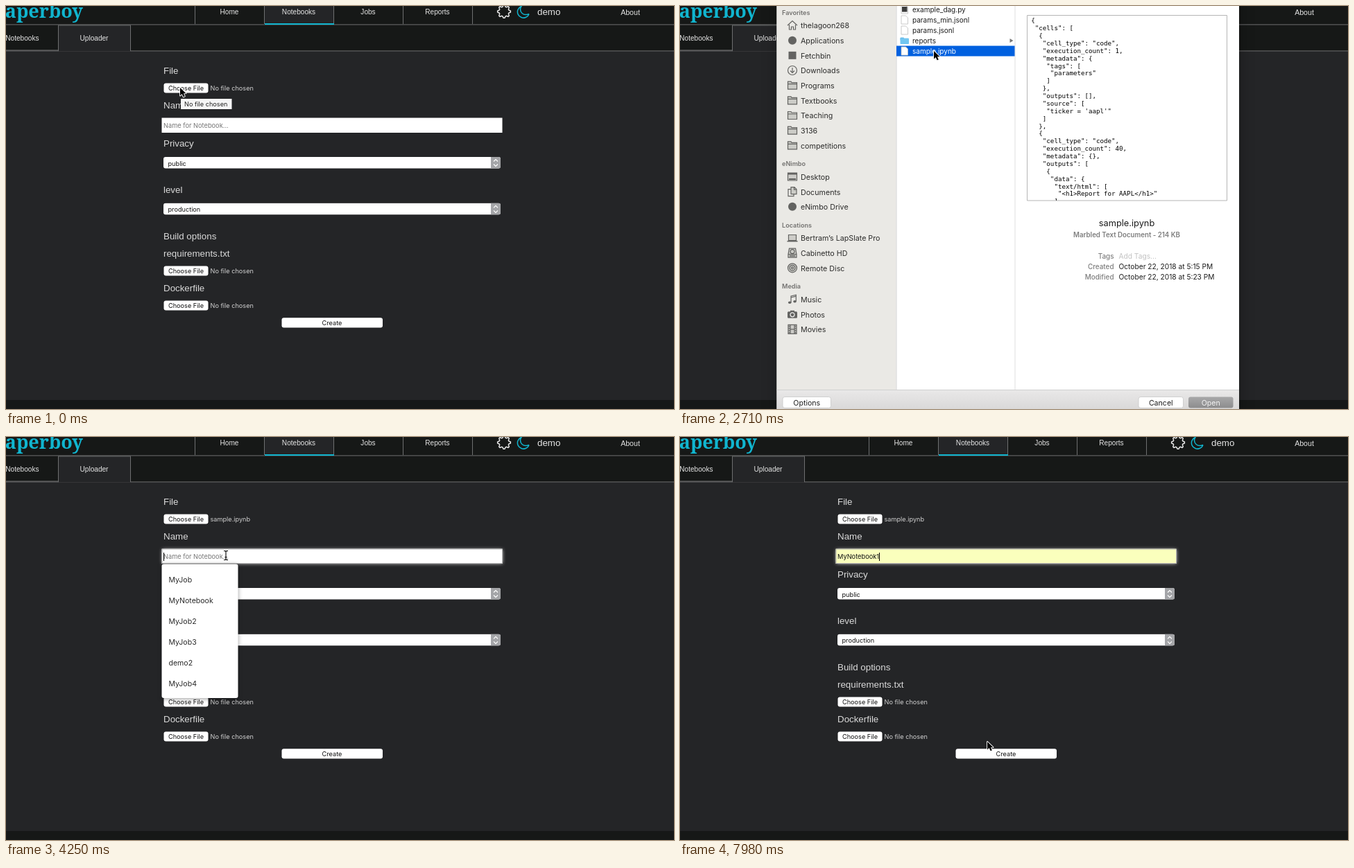
Recreate the animation shown at these times as an HTML page with a canvas. Size 963 px wide and 582 px high, loop 8000 ms.

```html
<!DOCTYPE html>
<html lang="en">
<head>
<meta charset="utf-8">
<title>Notebook uploader</title>
<style>
html, body { margin: 0; width: 100%; height: 100%; overflow: hidden; background: #242527; }
canvas { display: block; }
</style>
</head>
<body>
<canvas id="stage" width="963" height="582"></canvas>
<script>
const ctx = document.getElementById('stage').getContext('2d');
const LOOP = 8000;
const UI = 'Inter, sans-serif';
const WEB = '"Liberation Sans", Arial, sans-serif';
const MONO = '"DejaVu Sans Mono", monospace';
const TEAL = '#10b5cf', DARK = '#161817', BODY = '#242527', LINE = '#6e6f70';

// Each row starts with the time from which it holds.
const cursorSteps = [
  [0, 251, 118], [1380, 285, 102], [1530, 325, 82], [1820, 355, 62], [1970, 366, 52],
  [2120, 366, 58], [2260, 366, 65], [3480, 360, 95], [3620, 345, 130], [3800, 326, 159],
  [3950, 317, 171, 'beam'], [5890, 334, 182], [6190, 321, 189], [6340, 302, 190],
  [6480, 297, 199], [6930, 298, 215], [7080, 300, 240], [7230, 304, 275],
  [7380, 309, 310], [7530, 315, 345], [7680, 324, 380], [7830, 390, 414], [7980, 443, 440]
];
const typedSteps = [[0, 0], [4700, 1], [4850, 2], [5140, 3], [5290, 5], [5440, 6],
  [5590, 8], [5740, 10], [5890, 11]];
const sheetSteps = [[0, null], [930, -259], [1080, 0], [3150, -391.5], [3330, null]];
const caretSteps = [[0, false], [4250, true], [6190, false], [6780, true], [7230, false], [7980, true]];
const history = ['MyJob', 'MyNotebook', 'MyJob2', 'MyJob3', 'demo2', 'MyJob4', 'MyNotebook1'];

const sidebar = [
  [9.5, 'Favorites', ['house:thelagoon268', 'dot:Applications', 'square:Fetchbin', 'download:Downloads',
    'folder:Programs', 'folder:Textbooks', 'folder:Teaching', 'folder:3136', 'folder:competitions']],
  [228, 'eNimbo', ['desktop:Desktop', 'pages:Documents', 'dot:eNimbo Drive']],
  [316.5, 'Locations', ['laptop:Bertram’s LapSlate Pro', 'drive:Cabinetto HD', 'disc:Remote Disc']],
  [405, 'Media', ['music:Music', 'camera:Photos', 'film:Movies']]
];
const code = `{
 "cells": [
  {
   "cell_type": "code",
   "execution_count": 1,
   "metadata": {
    "tags": [
     "parameters"
    ]
   },
   "outputs": [],
   "source": [
    "ticker = 'aapl'"
   ]
  },
  {
   "cell_type": "code",
   "execution_count": 40,
   "metadata": {},
   "outputs": [
    {
     "data": {
      "text/html": [
       "<h1>Report for AAPL</h1>"
      ]`.split('\n');

const held = (steps, t) => steps.filter(s => s[0] <= t).pop();

function text(str, x, midY, size, color, { font = UI, align = 'left', weight = 400 } = {}) {
  ctx.font = `${weight} ${size}px ${font}`;
  ctx.fillStyle = color;
  ctx.textAlign = align;
  ctx.fillText(str, x, midY + size * 0.36);
}
function rect(x, y, w, h, color) {
  ctx.fillStyle = color;
  ctx.fillRect(x, y, w, h);
}
function round(x, y, w, h, r, color, border) {
  ctx.beginPath();
  ctx.roundRect(x, y, w, h, r);
  ctx.fillStyle = color;
  ctx.fill();
  if (border) stroke(border);
}
function stroke(color, width = 1) {
  ctx.strokeStyle = color;
  ctx.lineWidth = width;
  ctx.stroke();
}
function path(points, close) {
  ctx.beginPath();
  points.forEach(([x, y]) => ctx.lineTo(x, y));
  if (close) ctx.closePath();
}
function circle(x, y, r) {
  ctx.beginPath();
  ctx.arc(x, y, r, 0, Math.PI * 2);
}
function vertical(y0, y1, top, bottom) {
  const g = ctx.createLinearGradient(0, y0, 0, y1);
  g.addColorStop(0, top);
  g.addColorStop(1, bottom);
  return g;
}
function withShadow(color, blur, dy, draw) {
  ctx.save();
  ctx.shadowColor = color;
  ctx.shadowBlur = blur;
  ctx.shadowOffsetY = dy;
  draw();
  ctx.restore();
}

function drawHeader() {
  rect(0, 0, 963, 65, DARK);
  rect(0, 26.4, 963, 1, LINE);
  rect(0, 64.4, 963, 1, LINE);
  rect(372, 0, 101, 27, BODY);
  for (let x = 272; x <= 672; x += 100) rect(x, 0, 1, 26, LINE);
  rect(373, 25, 100, 2, TEAL);
  ['Home', 'Notebooks', 'Jobs', 'Reports'].forEach((name, i) =>
    text(name, 322 + i * 100, 8.5, 10.1, '#e4e4e4', { font: WEB, align: 'center' }));
  text('paperboy', 111, 6.8, 27, TEAL, { font: '"Noto Serif", serif', align: 'right', weight: 600 });

  ctx.beginPath();
  for (let i = 0; i < 32; i++) {
    const a = (i - 0.5) * Math.PI / 16, r = i % 4 < 2 ? 9.4 : 7.2;
    ctx.lineTo(718 + r * Math.cos(a), 8 + r * Math.sin(a));
  }
  ctx.closePath();
  stroke('#e8e8e8', 1.5);
  ctx.beginPath();
  ctx.arc(746, 8.5, 8.6, 0.35, 4.35);
  ctx.quadraticCurveTo(739.5, 6, 744, 10.5);
  ctx.quadraticCurveTo(748, 14, 754.1, 11.5);
  stroke(TEAL, 1.5);
  text('demo', 766, 8.5, 13.33, '#e4e4e4', { font: WEB });
  text('About', 900, 9, 10.6, '#e4e4e4', { font: WEB, align: 'center' });

  rect(75, 27.4, 105, 37.6, LINE);
  rect(76, 28.4, 103, 37, BODY);
  rect(0, 63.4, 75, 1, LINE);
  text('Notebooks', 47.5, 46, 10.1, '#e4e4e4', { font: WEB, align: 'right' });
  text('Uploader', 127, 46.5, 10.1, '#e4e4e4', { font: WEB, align: 'center' });
}

function drawFileInput(y, name) {
  round(227.5, y - 7, 64, 14, 3, '#fff');
  text('Choose File', 259.5, y + 0.3, 9.17, '#111', { align: 'center' });
  text(name, 294.5, y + 0.3, 9.17, '#d0d0d0');
}
function drawSelect(y, value) {
  ctx.save();
  ctx.beginPath();
  ctx.roundRect(227, y - 8.5, 486, 16.5, 3);
  ctx.clip();
  rect(227, y - 9, 486, 18, '#fff');
  rect(699, y - 9, 14, 18, '#a4a5a8');
  ctx.restore();
  path([[703, y - 2], [706, y - 5], [709, y - 2]]);
  stroke('#fff', 1.2);
  path([[703, y + 2], [706, y + 5], [709, y + 2]]);
  stroke('#fff', 1.2);
  text(value, 233.5, y + 0.7, 9.17, '#111');
}
function drawForm(t, typed) {
  const focused = t >= 4250, filled = t >= 6480;
  [['File', 93], ['Name', 143], ['Privacy', 198.5], ['level', 265], ['Build options', 332],
    ['requirements.txt', 357], ['Dockerfile', 407]].forEach(([label, y]) =>
    text(label, 227, y, 13.33, '#dadada', { font: WEB }));
  drawFileInput(118.5, t >= 3330 ? 'sample.ipynb' : 'No file chosen');
  drawFileInput(382.5, 'No file chosen');
  drawFileInput(432.5, 'No file chosen');
  drawSelect(226.5, 'public');
  drawSelect(293.3, 'production');
  round(397.5, 450.3, 145.5, 14.2, 3, '#fff');
  text('Create', 470, 457.8, 9.17, '#111', { align: 'center' });

  const field = () => rect(224.5, 161.5, 491, 21.5, filled ? '#faffbd' : '#fff');
  if (focused) {
    withShadow('#e4e4e4', 5, 0, field);
    ctx.beginPath();
    ctx.rect(225, 162, 490.5, 20.5);
    stroke('#b4b4b4');
  } else field();
  if (typed) text(typed, 227, 173, 9.25, '#111');
  else text('Name for Notebook...', 227, 173, 9.25, '#757575');
  if (held(caretSteps, t)[1]) {
    ctx.font = `400 9.25px ${UI}`;
    rect(Math.round(227 + ctx.measureText(typed).width), 167, 1, 12, '#000');
  }
}
function drawSuggestions(t, typed) {
  if (t < 4250 || t >= 6780) return;
  const rows = history.filter(s => s.startsWith(typed)).slice(0, 6);
  withShadow('rgba(0,0,0,.4)', 6, 1, () =>
    round(224.5, 183.5, 110, rows.length * 30 + 13.5, 3, '#fff'));
  if (t >= 6480) rect(224.5, 191, 110, 29, '#e6e6e6');
  rows.forEach((row, i) => text(row, 234.5, 206 + i * 30, 10.55, '#2a2a2a'));
}
function drawTooltip() {
  rect(252, 134, 73.5, 15, '#f6f6f6');
  text('No file chosen', 257, 141.5, 9.17, '#222');
}

// Icons are drawn around the origin.
function tint() {
  ctx.globalAlpha = 0.22;
  ctx.fill();
  ctx.globalAlpha = 1;
}
const icons = {
  house() {
    path([[-7, 0], [0, -6.5], [7, 0]]);
    ctx.moveTo(-4.5, -1); ctx.lineTo(-4.5, 6); ctx.lineTo(-1.5, 6); ctx.lineTo(-1.5, 2);
    ctx.lineTo(1.5, 2); ctx.lineTo(1.5, 6); ctx.lineTo(4.5, 6); ctx.lineTo(4.5, -1);
  },
  dot() { circle(0, 0, 6); ctx.fill(); },
  square() { ctx.beginPath(); ctx.rect(-5.5, -5.5, 11, 11); ctx.fill(); },
  download() {
    circle(0, 0, 6.5);
    ctx.moveTo(0, -4); ctx.lineTo(0, 3.5);
    ctx.moveTo(-3, 0.5); ctx.lineTo(0, 3.5); ctx.lineTo(3, 0.5);
  },
  folder() {
    path([[-6.5, 5.5], [-6.5, -5.5], [-2, -5.5], [-1, -4], [6.5, -4], [6.5, 5.5]], true);
    tint();
    ctx.moveTo(-6.5, -2); ctx.lineTo(6.5, -2);
  },
  desktop() {
    ctx.beginPath();
    ctx.rect(-6.5, -5.5, 13, 11);
    tint();
    ctx.fillRect(-6.5, -5.5, 13, 2.5);
    ctx.fillRect(-5, 2.5, 10, 2);
  },
  pages() {
    path([[-2, -6.5], [3, -6.5], [6, -3.5], [6, 3.5], [-2, 3.5]], true);
    tint();
    ctx.moveTo(2.5, -6.5); ctx.lineTo(2.5, -3); ctx.lineTo(6, -3);
    ctx.moveTo(-2, -3.5); ctx.lineTo(-6, -3.5); ctx.lineTo(-6, 6.5); ctx.lineTo(2, 6.5); ctx.lineTo(2, 3.5);
  },
  laptop() {
    ctx.beginPath();
    ctx.rect(-5.5, -4.5, 11, 8);
    tint();
    ctx.fillRect(-7.5, 4, 15, 1.5);
  },
  drive() {
    path([[-6, 6.5], [-6, 2], [-4.5, -6.5], [4.5, -6.5], [6, 2], [6, 6.5]], true);
    tint();
    ctx.moveTo(-6, 2); ctx.lineTo(6, 2);
    ctx.moveTo(3, -2); ctx.arc(0, -2, 3, 0, 7);
    ctx.fillRect(-4, 3.5, 8, 1.5);
  },
  disc() {
    circle(0, 0, 6.5);
    tint();
    ctx.moveTo(4, 0); ctx.arc(0, 0, 4, 0, 7);
    ctx.moveTo(1.5, 0); ctx.arc(0, 0, 1.5, 0, 7);
  },
  music() {
    ctx.beginPath();
    ctx.ellipse(-3.8, 4.8, 2.3, 1.8, 0, 0, 7);
    ctx.ellipse(3.5, 3.2, 2.3, 1.8, 0, 0, 7);
    ctx.fill();
    path([[-2, 5], [-2, -4.5], [5.3, -6.3], [5.3, 3]]);
    ctx.moveTo(-2, -2.5); ctx.lineTo(5.3, -4.3);
  },
  camera() {
    ctx.beginPath();
    ctx.roundRect(-7, -4, 14, 9.5, 1.5);
    ctx.rect(-3, -5.5, 6, 1.5);
    ctx.fill();
    ctx.strokeStyle = '#f0f0ee';
    circle(0, 0.7, 3);
  },
  film() {
    ctx.beginPath();
    ctx.rect(-6, -6.5, 12, 13);
    tint();
    ctx.rect(-3, -6.5, 6, 13);
    ctx.moveTo(-3, 0); ctx.lineTo(3, 0);
    for (let y = -5; y < 6; y += 3) {
      ctx.fillRect(-5.5, y, 2, 1.5);
      ctx.fillRect(3.5, y, 2, 1.5);
    }
  }
};
function drawIcon(kind, x, y, color) {
  ctx.save();
  ctx.translate(x, y);
  ctx.fillStyle = ctx.strokeStyle = color;
  ctx.lineWidth = 1.2;
  icons[kind]();
  if (kind !== 'dot' && kind !== 'square') ctx.stroke();
  ctx.restore();
}

function drawSidebar(active) {
  const label = active ? '#2c2c2b' : '#636363';
  for (const [y, title, items] of sidebar) {
    text(title, 147, y, 9.1, active ? '#737270' : '#808080', { weight: 600 });
    items.forEach((item, i) => {
      const [kind, name] = item.split(':'), rowY = y + 19 + i * 21.67;
      drawIcon(kind, 162, rowY - 0.5, active ? '#636361' : '#7c7c7c');
      text(name, 174, rowY, 10.7, label);
    });
  }
}
function drawFiles(selected) {
  ['example_dag.py', 'params_min.jsonl', 'params.jsonl', 'reports', 'sample.ipynb'].forEach((name, i) => {
    const y = 5 + i * 15, picked = selected && i === 4;
    if (picked) rect(312, 57.5, 170.5, 15, '#0060df');
    if (name === 'reports') {
      round(317.5, y - 4.5, 5.5, 4, 1, '#5db4e4');
      round(317.5, y - 3.5, 12.5, 8.5, 1, '#72c6f1');
      path([[475.5, y - 3], [480.5, y], [475.5, y + 3]], true);
      ctx.fillStyle = '#777';
      ctx.fill();
    } else {
      path([[319, y - 6], [325.5, y - 6], [328.5, y - 3], [328.5, y + 6], [319, y + 6]], true);
      ctx.fillStyle = '#fff';
      ctx.fill();
      stroke('#bdbdbd', 0.8);
      if (i === 0) rect(320, y - 4, 7.5, 7.5, '#3c3c3c');
    }
    text(name, 335, y, 10, picked ? '#fff' : '#1c1c1c');
  });
}
function drawPreview() {
  ctx.save();
  ctx.beginPath();
  ctx.rect(500.5, 13.5, 288, 267.5);
  stroke('#b5b5b5');
  ctx.clip();
  code.forEach((line, i) => text(line, 506.3, 21 + i * 10.875, 9.17, '#000', { font: MONO }));
  ctx.restore();
  text('sample.ipynb', 644, 313, 12.8, '#1c1c1c', { align: 'center' });
  text('Marbled Text Document - 214 KB', 644, 330.5, 9.7, '#7d7d7d', { align: 'center', weight: 600 });
  [['Tags', 'Add Tags...', '#c2c2c2'], ['Created', 'October 22, 2018 at 5:15 PM', '#1c1c1c'],
    ['Modified', 'October 22, 2018 at 5:23 PM', '#1c1c1c']].forEach(([key, value, color], i) => {
    const y = 361.5 + i * 15;
    text(key, 625.5, y, 9.9, '#7d7d7d', { align: 'right', weight: 500 });
    text(value, 632.5, y, 10.2, color);
  });
}
function drawButton(x, w, label, fill, color, border) {
  round(x, 564.5, w, 16, 3, fill, border);
  text(label, x + w / 2, 572.7, 10.6, color, { align: 'center' });
}
function drawSheet(t) {
  const offset = held(sheetSteps, t)[1];
  if (offset === null) return;
  const active = t >= 1080;
  ctx.save();
  ctx.translate(0, offset);
  withShadow('rgba(0,0,0,.3)', 20, 4, () => rect(139.5, -400, 666.5, 989, '#fff'));
  rect(139.5, -400, 172, 955, active ? '#eae9e5' : '#f4f4f4');
  rect(311.5, -400, 1, 955, '#d2d2d1');
  rect(482.5, -400, 1, 955, '#dfdfdf');
  rect(139.5, 554.5, 666.5, 34.5, active ? vertical(555, 590, '#e9e8e8', '#d5d4d4') : '#f4f4f4');
  rect(139.5, 554, 666.5, 1, active ? '#d0d0d0' : '#d9d9d9');
  drawSidebar(active);
  if (t >= 1230) drawFiles(t >= 2560);
  if (t >= 2710) drawPreview();
  drawButton(148, 69.5, 'Options', '#fff', '#1c1c1c', '#cfcfcf');
  drawButton(661, 64.5, 'Cancel', '#fff', '#1c1c1c', '#cfcfcf');
  if (t < 2560) drawButton(733, 64.5, 'Open', '#f8f8f8', '#bcbcbc', '#dedede');
  else if (t < 3000) drawButton(733, 64.5, 'Open', vertical(564, 581, '#a9a9aa', '#8b8b8c'), '#f4f4f4');
  else drawButton(733, 64.5, 'Open', vertical(564, 581, '#7c7c7d', '#535354'), '#fff');
  ctx.restore();
}

function drawCursor(t) {
  const [, x, y, shape] = held(cursorSteps, t);
  ctx.save();
  ctx.translate(x, y);
  if (shape === 'beam') {
    path([[-3, -6.5], [-1, -6.5], [0, -5.5], [1, -6.5], [3, -6.5]]);
    ctx.moveTo(-3, 6.5); ctx.lineTo(-1, 6.5); ctx.lineTo(0, 5.5); ctx.lineTo(1, 6.5); ctx.lineTo(3, 6.5);
    ctx.moveTo(0, -5.5); ctx.lineTo(0, 5.5);
    ctx.moveTo(-1.5, 2.5); ctx.lineTo(1.5, 2.5);
    stroke('#000', 1.1);
  } else {
    path([[0, 0], [0, 11.5], [2.7, 9], [4.6, 13.3], [6.8, 12.4], [4.9, 8.2], [8.5, 8.2]], true);
    ctx.lineJoin = 'round';
    stroke('#fff', 1.8);
    ctx.fillStyle = '#000';
    ctx.fill();
  }
  ctx.restore();
}

function frame() {
  const t = performance.now() % LOOP;
  const typed = 'MyNotebook1'.slice(0, held(typedSteps, t)[1]);
  rect(0, 0, 963, 582, BODY);
  rect(0, 569, 963, 13, DARK);
  drawHeader();
  drawForm(t, typed);
  drawSuggestions(t, typed);
  if (t < 600) drawTooltip();
  drawSheet(t);
  drawCursor(t);
  requestAnimationFrame(frame);
}
frame();
</script>
</body>
</html>
```
